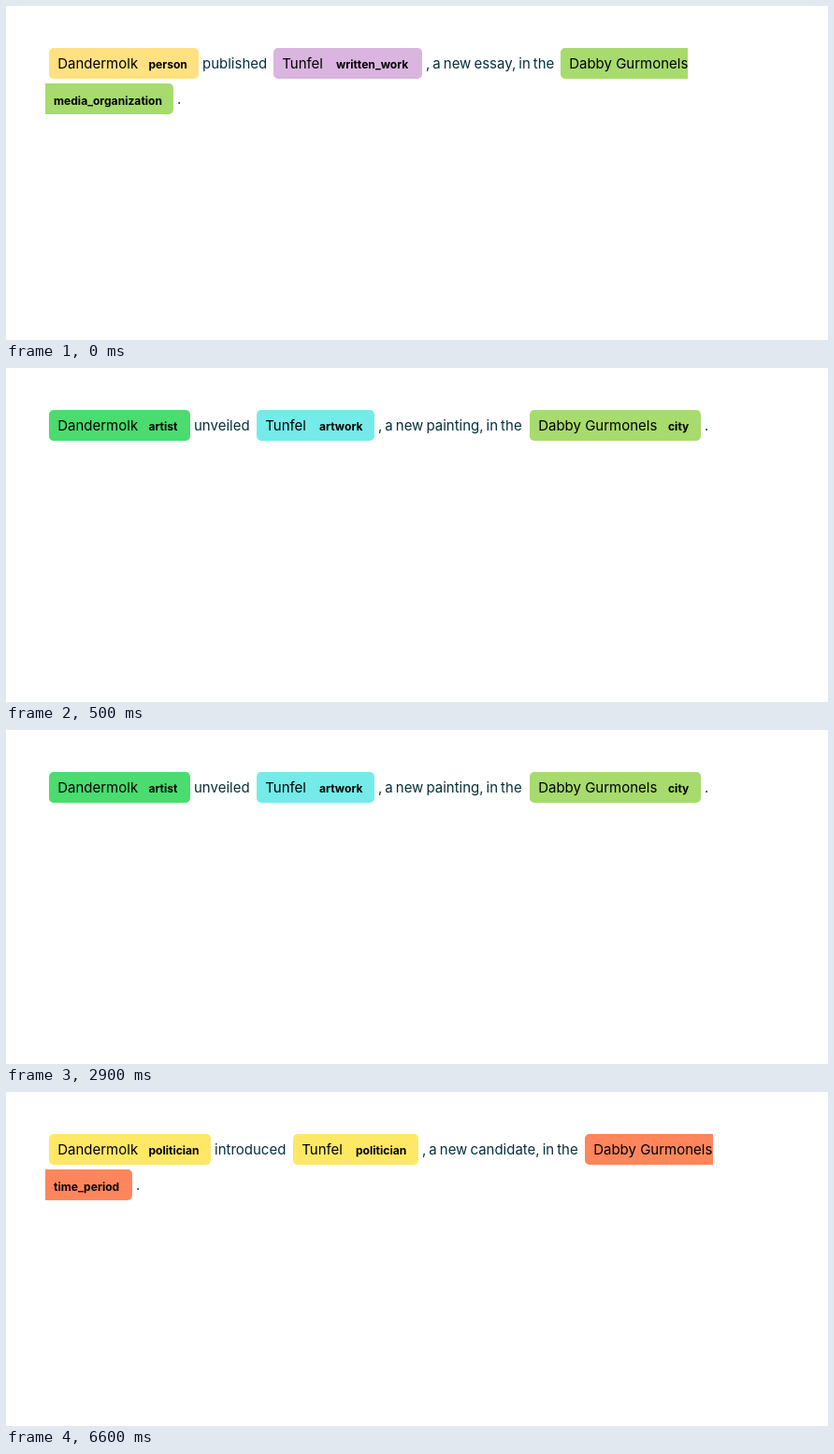
Write an HTML page that moves like this. It is 879 px wide and 358 px high and loops after 8000 ms.

```html
<!DOCTYPE html>
<html lang="en">
<head>
<meta charset="utf-8">
<title>Entity labels</title>
<style>
  html, body { margin: 0; width: 100%; height: 100%; overflow: hidden; background: #fff; }
  svg { display: block; width: 100%; height: 100%; }
  text { white-space: pre; }
  .word { font: 400 15px Inter, sans-serif; word-spacing: -1.2px; fill: #06303a; }
  .name { font: 400 15px Inter, sans-serif; fill: #000; }
  .tag { font: 700 12.1px Inter, sans-serif; fill: #000; }
</style>
</head>
<body>
<svg id="stage" viewBox="0 0 879 358"></svg>
<script>
const LOOP = 8000;
const LINE = [45, 83];
const RADIUS = 4.8, PAD = 9.2, GAP = 4;

// Each entity name, with the offset of its label from the chip's left edge
const NAMES = [["Dandermolk", 106.4], ["Tunfel", 67], ["Dabby Gurmonels", 148]];

// chips: [left, right, fill, label]; words follow each chip;
// wrap: right edge of the last chip's second line
const SCENES = [
  {
    start: 0,
    chips: [[46, 206, "#ffe181", "person"], [286, 445, "#d9b5df", "written_work"],
            [593, 729, "#a7db6d", "media_organization"]],
    words: ["published", ", a new essay, in the", "."],
    wrap: 179
  },
  {
    start: 500,
    chips: [[46, 197, "#4adc6e", "artist"], [268, 394, "#74ebe8", "artwork"],
            [560, 743, "#a7db6d", "city"]],
    words: ["unveiled", ", a new painting, in the", "."]
  },
  {
    start: 4500,
    chips: [[46, 219, "#ffe866", "politician"], [307, 441, "#ffe866", "politician"],
            [619, 756, "#ff865c", "time_period"]],
    words: ["introduced", ", a new candidate, in the", "."],
    wrap: 135
  }
];

const text = (cls, x, y, str) => `<text class="${cls}" x="${x}" y="${y}">${str}</text>`;

// Box with separately rounded left and right ends
function box(left, right, top, fill, a = RADIUS, b = RADIUS) {
  const h = 33;
  return `<path fill="${fill}" d="M${left + a} ${top}H${right - b}a${b} ${b} 0 0 1 ${b} ${b}` +
    `v${h - 2 * b}a${b} ${b} 0 0 1 ${-b} ${b}H${left + a}a${a} ${a} 0 0 1 ${-a} ${-a}` +
    `v${2 * a - h}a${a} ${a} 0 0 1 ${a} ${-a}z"/>`;
}

function sceneMarkup({ chips, words, wrap }) {
  return chips.map(([left, right, fill, label], i) => {
    const [name, offset] = NAMES[i];
    const wrapped = wrap && i === chips.length - 1;
    const [top, next] = LINE;
    let out = box(left, right, top, fill, RADIUS, wrapped ? 0 : RADIUS) +
      text("name", left + PAD, top + 22, name);
    if (wrapped) {
      out += box(42, wrap, next, fill, 0) +
        text("tag", 51, next + 23, label) +
        text("word", wrap + GAP, next + 22, words[i]);
    } else {
      out += text("tag", left + offset, top + 22, label) +
        text("word", right + GAP, top + 22, words[i]);
    }
    return out;
  }).join("");
}

const stage = document.getElementById("stage");
let shown = null;

function draw(time) {
  const t = time % LOOP;
  const scene = SCENES.filter(s => s.start <= t).pop();
  if (scene === shown) return;
  shown = scene;
  stage.innerHTML = sceneMarkup(scene);
}

const began = performance.now();
function tick() {
  draw(performance.now() - began);
  requestAnimationFrame(tick);
}
tick();
</script>
</body>
</html>
```
